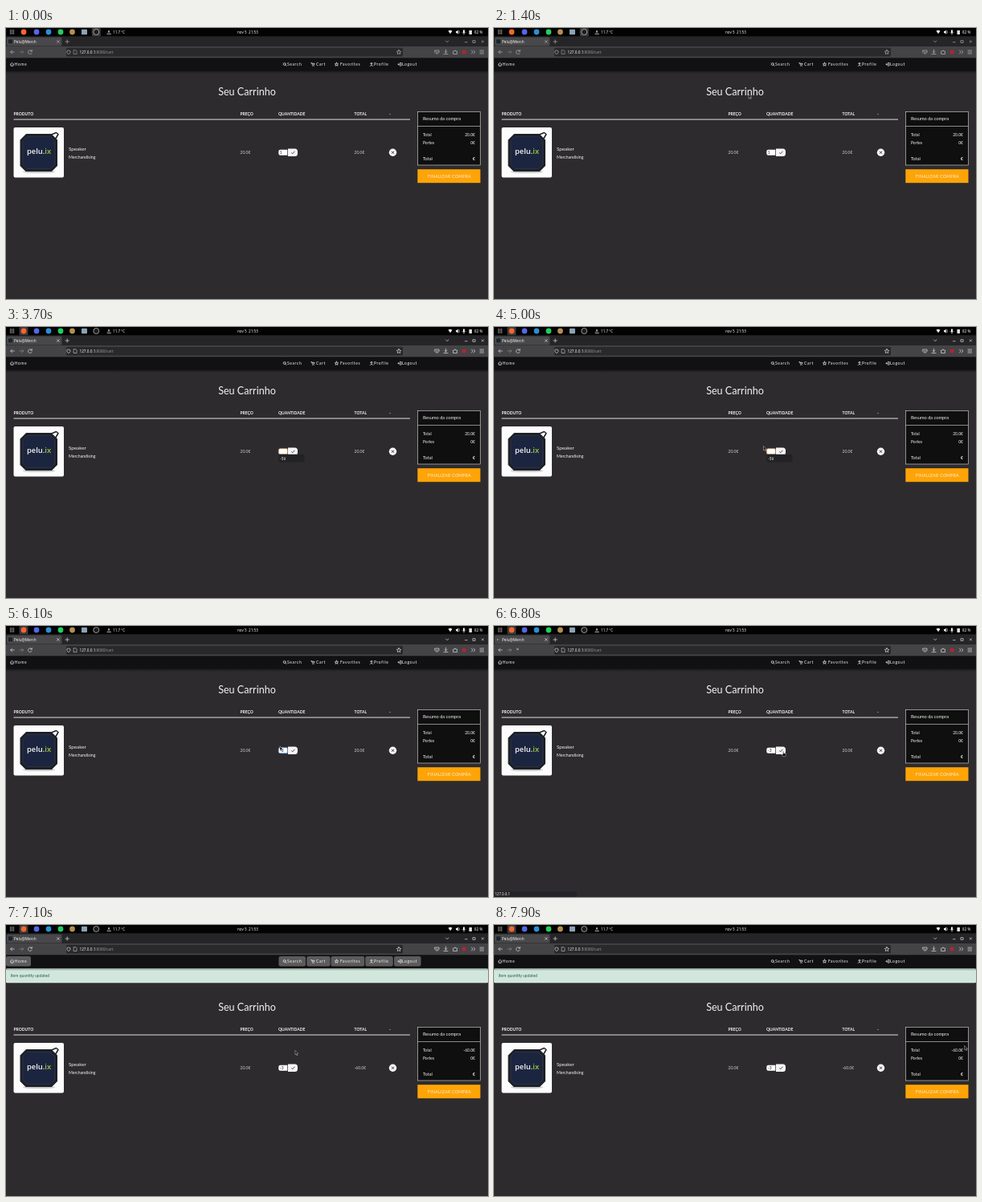
Write an HTML page that moves like this. It is 600x338 px and loops after 8 s.

```html
<!DOCTYPE html>
<html lang="pt">
<head>
<meta charset="utf-8">
<title>Seu Carrinho</title>
<style>
  html, body { margin: 0; width: 100%; height: 100%; overflow: hidden; background: #2d2b2d; }
  svg { display: block; width: 600px; height: 338px; }
  text { font: 5px Lato, sans-serif; fill: #f4f4f4; white-space: pre; }
  .ui text { font: 4.7px "Noto Sans", "Open Sans", sans-serif; }
  .ui .dim { fill: #98979d; }
  .bar text { font-weight: 500; font-size: 4.6px; }
  .line { fill: none; stroke: #dcdcdf; stroke-width: .7; stroke-linecap: round; stroke-linejoin: round; }
  .th { font-weight: 700; }
  .soft { fill: #cfcfcf; }
  .end { text-anchor: end; }
  .mid { text-anchor: middle; }
  .nav text { letter-spacing: .6px; fill: currentColor; }
  .nav .line { stroke: currentColor; }
  #qty { fill: #222; }
</style>
</head>
<body>
<svg viewBox="0 0 600 338">
  <defs>
    <linearGradient id="shade" x2="0" y2="1">
      <stop stop-color="#000" stop-opacity=".5"/><stop offset="1" stop-color="#000" stop-opacity="0"/>
    </linearGradient>
  </defs>
  <rect width="600" height="338" fill="#2d2b2d"/>

  <g id="page">
    <text class="mid" x="300" y="83.7" style="font-size:12.6px">Seu Carrinho</text>
    <text class="th" x="9.5" y="109">PRODUTO</text>
    <text class="th" x="291.5" y="109">PREÇO</text>
    <text class="th" x="339" y="109">QUANTIDADE</text>
    <text class="th" x="433.5" y="109">TOTAL</text>
    <text class="th" x="477" y="109">-</text>
    <rect x="9.5" y="113.6" width="493.5" height=".9" fill="#f4f4f4"/>

    <g id="photo">
      <rect x="9.5" y="124" width="62.5" height="62.5" rx="2" fill="#fcfcfc"/>
      <ellipse cx="41" cy="179.5" rx="20" ry="1.6" fill="#c9cacc"/>
      <path d="M54 134L62.5 130.5L65 132.500L60 141" fill="none" stroke="#23262a" stroke-width="1.600" stroke-linejoin="round"/>
      <path d="M25.500 133H56L63 140V171.500L56.500 178H25L18.500 171.500V140Z" fill="#1d2127" stroke="#1d2127" stroke-width="2" stroke-linejoin="round"/>
      <path d="M26 135.500H55.500L60.500 140.500V170.500L55.500 175.500H26L21 170.500V140.500Z" fill="#1c253f" stroke="#343b48" stroke-width=".6"/>
      <text class="mid" x="41" y="157.300" style="font:600 9.400px 'Open Sans',sans-serif">pelu.<tspan fill="#9fcb3b">ix</tspan></text>
    </g>
    <text id="alt" class="soft" x="10.500" y="130.500">Speaker</text>

    <text x="78" y="152.700" style="font-size:6.250px">Speaker</text>
    <text x="78" y="162.700" style="font-size:5.200px">Merchandising</text>
    <text class="soft" x="291.500" y="157">20.0€</text>
    <text id="rowTotal" class="soft" x="433.500" y="157"></text>

    <path d="M341.500 151.700H350.300V158.700H341.500Q339.300 158.700 339.300 156.500V153.900Q339.300 151.700 341.500 151.700Z" fill="#fff"/>
    <path d="M351 150.500H359.500Q363 150.500 363 154V156.500Q363 160 359.500 160H351Z" fill="#f6f6f6"/>
    <path d="M355.200 155.400l1.500 1.500 2.700-3.200" fill="none" stroke="#222" stroke-width=".8"/>
    <rect id="select" x="340.600" y="152.500" width="3.400" height="5.600" fill="#5b9be8"/>
    <rect id="focus" x="339.400" y="151.700" width="11" height="7" rx="1.800" fill="none" stroke-width=".7"/>
    <text id="qty" x="340.800" y="157"></text>
    <circle cx="481.500" cy="155.300" r="4.700" fill="#f6f6f6"/>
    <path d="M480 153.800l3 3m0-3l-3 3" stroke="#222" stroke-width=".9"/>

    <rect x="512.500" y="104.500" width="78" height="66.500" fill="#100f10" stroke="#dcdcdc" stroke-width=".6"/>
    <path d="M512.500 122.500H590.500" stroke="#dcdcdc" stroke-width=".6"/>
    <text x="519" y="115.200" style="font-size:5.650px">Resumo da compra</text>
    <text x="519" y="134.500">Total</text>
    <text id="sum" class="end" x="584" y="134.500"></text>
    <text x="519" y="145.400">Portes</text>
    <text class="end" x="584" y="145.400">0€</text>
    <text x="519" y="164.500" style="font-size:5.600px">Total</text>
    <text class="end th" x="584" y="164.500">€</text>
    <rect x="512.300" y="176.200" width="78.200" height="17" fill="#ffa407"/>
    <text x="525" y="186.700" style="letter-spacing:.4px">FINALIZAR COMPRA</text>
  </g>

  <g id="list">
    <rect x="339.500" y="158.800" width="32" height="9.600" rx="1" fill="#222124"/>
    <text x="341" y="165.500" style="font-size:4.800px">-56</text>
  </g>

  <g id="alert">
    <rect y="54" width="600" height="18.300" rx="1.500" fill="#d1e7dd"/>
    <text x="5.500" y="65" style="fill:#28604a">Item quantity updated</text>
  </g>

  <rect y="53" width="600" height="4" fill="url(#shade)"/>
  <rect y="37" width="600" height="16.500" fill="#111012"/>
  <g id="nav" class="nav"></g>

  <g class="ui">
    <rect y="10" width="600" height="13.500" fill="#252527"/>
    <rect x="1" y="11.500" width="68.500" height="11" rx="1.500" fill="#48484a"/>
    <rect y="23" width="600" height="14.300" fill="#444446"/>
    <rect x="75" y="24.700" width="419" height="10.800" rx="1.500" fill="#29292b"/>
    <rect id="icon" x="3" y="14.300" width="5" height="5" fill="#17262b"/>
    <circle id="load" cx="4.500" cy="17" r=".8" fill="#b9c7ce"/>
    <text x="10" y="18.600">Pelu@Merch</text>
    <g id="tools" class="line">
      <path d="M63.500 15.600l2.800 2.800m0-2.800l-2.800 2.800M74 17h4.400M76.200 14.800v4.400"/>
      <path d="M547.500 16l1.700 1.700 1.700-1.700M571.500 17.700h2.600M581.300 15.700h2.800v2.600h-2.800z"/>
      <path d="M592.300 15.800l2.200 2.200m0-2.200l-2.200 2.200"/>
      <path d="M10.300 30H5.700m2-2l-2 2 2 2"/>
      <path d="M17 30h4.600m-2-2l2 2-2 2" opacity=".45"/>
      <path id="reload" d="M32 28.800a2.400 2.400 0 1 0 .2 2.200M32.300 27.300v1.700h-1.700"/>
      <path id="stop" d="M28.500 28l1.800 1.800m0-1.800l-1.800 1.800"/>
      <path d="M78 28l2 .8v1.600q-.3 1.500-2 2.200-1.700-.7-2-2.200v-1.600z"/>
      <path d="M84.500 27.700h2.500l1 1v3.800h-3.500z" opacity=".8"/>
      <path d="M489 27.300l.8 1.800 2 .2-1.500 1.300.4 2-1.700-1-1.700 1 .4-2-1.500-1.300 2-.2z"/>
      <path d="M534 28h5v2.500q-2.500 3.500-5 0zM535.200 29.600l1.300 1.200 1.300-1.200"/>
      <path d="M547.500 27v3.800m-1.700-1.500l1.700 1.600 1.700-1.600M545 32.500h5"/>
      <path d="M557 29h1.200q.8-2.500 1.600 0h1.700v3.500H557z"/>
      <path d="M579.500 28l1.700 2-1.700 2m2.700-4l1.700 2-1.700 2M590 28h4.500M590 30h4.500M590 32h4.500"/>
    </g>
    <rect x="568" y="27.800" width="4.500" height="4.500" rx=".6" fill="#b72231"/>
    <text x="91.500" y="31.700">127.0.0.1<tspan class="dim">:8080/cart</tspan></text>
  </g>

  <g class="ui bar">
    <rect width="600" height="10.300" fill="#030303"/>
    <rect id="active" y="0" width="11" height="10.300" rx="1.500" fill="#3a393b"/>
    <g id="dock"></g>
    <path class="line" d="M126 7.500h4.500M127 6l1-3 1 3"/>
    <text x="133" y="6.900">11.7 °C</text>
    <text x="288" y="6.900">nov 5  21:53</text>
    <path d="M550.500 3.800q2.500-2 5 0L553 7.300z" fill="#eee"/>
    <path d="M560 4h1.200l1.600-1.500v5.200l-1.600-1.500H560zM569 2.500h2v3.500h-2zM576.500 3h3.400v5h-3.400z" fill="#eee"/>
    <path class="line" d="M564 3.500q1 1.600 0 3.200M568 5.500q2 3 4 0M570 7.200v1"/>
    <text x="583" y="6.900">82 %</text>
  </g>

  <g id="status" class="ui">
    <rect y="331" width="103" height="7" fill="#242327"/>
    <text x="1" y="336.300" style="font-size:4.500px">127.0.0.1</text>
  </g>

  <g id="cursor" stroke="#e6e6e6" stroke-width=".45" fill="#080808" stroke-linejoin="round">
    <path id="arrow" d="M0 0V5.300L1.200 4.200L2.100 6.200L3 5.800L2.100 3.900H3.700Z"/>
    <path id="hand" d="M-.6 0H.4V2.300L3 2.800V5L2.300 6.300H-.6L-2 3.800L-.6 3.800Z"/>
    <path id="beam" d="M-1.200 -2.800H1.200M0 -2.800V2.800M-1.200 2.800H1.200" fill="none" stroke="#333" stroke-width=".6"/>
  </g>
</svg>
<script>
const $ = id => document.getElementById(id);
const LOOP = 8000, STEP = 100;

// label, icon centre, text x, button left, button width, icon path
const navItems = [
  ['Home', 7.5, 10.5, 0, 31, 'M-2.200 0L0-2 2.200 0M-1.500 0V2H1.500V0'],
  ['Search', 347, 350, 339.5, 33.5, 'M1.200-.3A1.500 1.500 0 1 1-1.800-.3A1.500 1.500 0 1 1 1.200-.3M.8.900L2 2.100'],
  ['Cart', 382, 386, 374.3, 29.3, 'M-2.200-1.800H-1.300L-.6.800H1.500L2-1H-1M-.3 2V2.100M1.200 2V2.100'],
  ['Favorites', 411.5, 416, 404.5, 41.7, 'M0-2.200L.7-.6 2.200-.5 1 .5 1.400 2 0 1.200-1.400 2-1 .5-2.200-.5-.7-.6Z'],
  ['Profile', 455, 458, 447.3, 34.5, 'M-1-1A1 1 0 1 1 1-1A1 1 0 1 1-1-1M-1.800 2.200Q0-.6 1.800 2.200'],
  ['Logout', 490, 493, 483, 33.5, 'M.5-1.800H2V1.800H.5M1 0H-1.800M-.7-1.200L-1.900 0-.7 1.200'],
];
$('nav').innerHTML = navItems.map(([label, ix, tx, x, w, d]) => `
  <rect class="pill" x="${x}" y="39" width="${w}" height="12.500" rx="2.200" fill="#f0f0f0"/>
  <path class="line" d="${d}" transform="translate(${ix} 45.300)"/>
  <text x="${tx}" y="47">${label}</text>`).join('');
const pills = document.querySelectorAll('.pill');

const dots = [[22, '#f2662f'], [38, '#5865e8'], [53, '#2b8fd6'], [68, '#20cf62'], [82.5, '#b58f50']];
let dock = dots.map(([x, c]) => `<circle cx="${x}" cy="5" r="3.400" fill="${c}"/>`).join('');
dock += '<rect x="94" y="1.700" width="7" height="6.600" rx=".8" fill="#8ba4b6"/>' +
  '<circle cx="112.300" cy="5" r="3.500" fill="#1c1b1d" stroke="#d0d0d0" stroke-width=".7"/>';
for (let i = 0; i < 9; i++)
  dock += `<rect x="${5 + i % 3 * 2}" y="${2.4 + Math.floor(i / 3) * 2}" width="1.100" height="1.100" fill="#ddd"/>`;
$('dock').innerHTML = dock;

// time, x, y, shape; an empty shape hides the pointer
const track = [
  [0, 338, 203, ''], [600, 338, 203, 'arrow'], [700, 337, 184, 'arrow'], [1000, 337, 184, 'arrow'],
  [1200, 325, 117, 'arrow'], [1400, 317, 82.5, 'arrow'], [1500, 316, 82, 'arrow'],
  [1700, 335, 122, 'arrow'], [1900, 345, 154, 'beam'], [3000, 345, 154, ''],
  [5000, 335.5, 148.5, 'arrow'], [5800, 336, 149, ''], [6100, 341, 150, 'arrow'],
  [6300, 354, 156, 'hand'], [6500, 361, 156, 'hand'], [6900, 360, 156.5, 'arrow'],
  [7100, 360, 156.5, 'arrow'], [7300, 420, 160, 'arrow'], [7600, 570, 154, 'arrow'],
  [7800, 594, 151.5, 'arrow'], [7900, 585.7, 150.5, 'arrow'], [LOOP, 585.7, 150.5, 'arrow'],
];
// time, value of the quantity field
const typed = [[0, '1'], [3000, ''], [3200, '-'], [3600, ''], [5600, '-'], [5800, '-3']];

const show = (id, on) => { $(id).style.display = on ? '' : 'none'; };
const within = (t, from, to) => t >= from && t < to;

function moveCursor(t) {
  const i = track.findLastIndex(k => k[0] <= t);
  const a = track[i], b = track[i + 1];
  const p = (t - a[0]) / (b[0] - a[0]);
  const x = a[1] + (b[1] - a[1]) * p, y = a[2] + (b[2] - a[2]) * p;
  $('cursor').setAttribute('transform', `translate(${x} ${y})`);
  for (const shape of ['arrow', 'hand', 'beam']) show(shape, shape === a[3]);
}

function draw(t) {
  const updated = t >= 6900, loading = within(t, 6600, 7100);
  const total = updated ? '-60.0€' : '20.0€';
  $('page').setAttribute('transform', `translate(0 ${updated ? 23 : 0})`);
  $('rowTotal').textContent = $('sum').textContent = total;
  $('qty').textContent = typed.findLast(k => k[0] <= t)[1];
  show('alert', updated);
  show('photo', !within(t, 6900, 7000));
  show('alt', within(t, 6900, 7000));
  show('select', within(t, 2300, 3000));
  show('focus', within(t, 2000, 6500));
  $('focus').setAttribute('stroke', within(t, 3000, 5800) ? '#d99a5b' : '#5b9be8');
  show('list', within(t, 3600, 5800));
  show('status', within(t, 6500, 7100));
  show('load', loading);
  show('icon', !loading);
  show('stop', loading);
  show('reload', !loading);
  $('active').setAttribute('x', t < 2000 ? 106.8 : 16.5);
  $('tools').setAttribute('opacity', t < 2000 ? 0.75 : 1);

  const flash = updated ? Math.max(0, 1 - (t - 6900) / 300) : 0;
  pills.forEach(p => p.setAttribute('opacity', flash));
  $('nav').style.color = flash > 0.5 ? '#1d1d1f' : '#f4f4f4';
  moveCursor(t);
}

function tick() {
  draw(Math.floor(performance.now() % LOOP / STEP) * STEP);
  requestAnimationFrame(tick);
}
tick();
</script>
</body>
</html>
```
